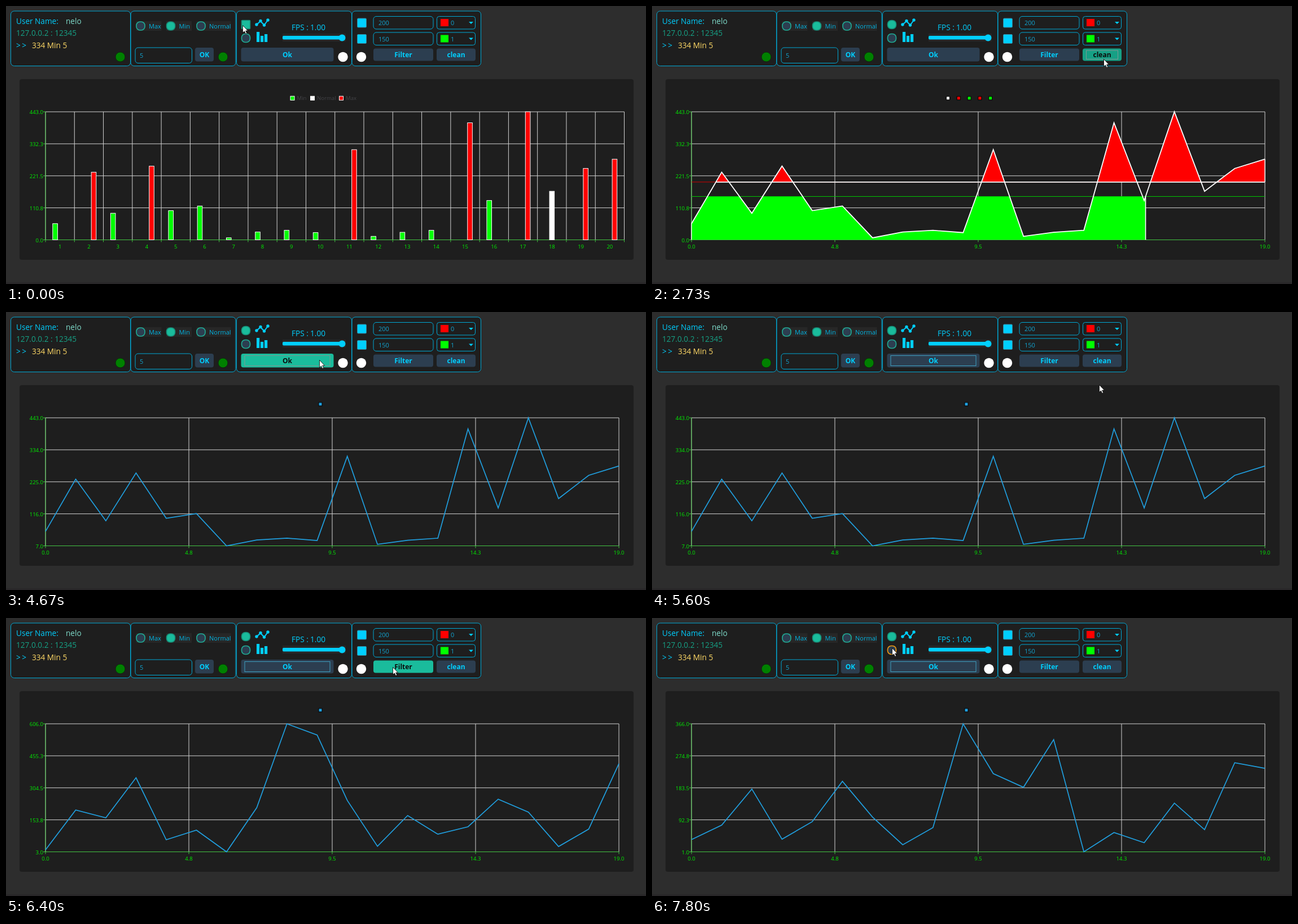
Recreate the animation shown at these times as an HTML page. Size 1134 px wide and 494 px high, loop 8000 ms.

```html
<!DOCTYPE html>
<html lang="en">
<head>
<meta charset="utf-8">
<title>Live chart panel</title>
<style>
  html, body { margin: 0; width: 100%; height: 100%; overflow: hidden; background: #2d2d2d; }
  svg { display: block; width: 1134px; height: 494px; font-family: "Open Sans", "Noto Sans", sans-serif; }
  .panel { fill: #1e1e1e; stroke: #00a9d6; }
  .field { fill: #1e1e1e; stroke: #00a9d6; }
  .cyan { fill: #00cfff; }
  .dim { fill: #12a3cf; }
  .big { font-size: 13.6px; }
  .small { font-size: 11px; }
  .axis text { font-size: 9.5px; fill: #00ee00; }
  .radio { fill: #2c3e50; stroke: #1fae96; stroke-width: 1.6; }
  .on { fill: #1abc9c; stroke: #178f79; }
  .press { stroke: #f39c12; }
  .btn rect { fill: #2c3e50; }
  .btn text { font-size: 12px; font-weight: 700; text-anchor: middle; fill: #00cfff; }
  .btn .ring { fill: none; stroke: #3f9fc0; visibility: hidden; }
  .btn.hover rect { fill: #1abc9c; }
  .btn.down rect { fill: #16a085; }
  .btn.hover text, .btn.down text { fill: #0c0c0c; }
  .btn.focus .ring { fill: none; visibility: inherit; }
  .btn.focus.hover .ring, .btn.focus.down .ring { stroke: #7c9a93; }
</style>
</head>
<body>
<svg id="stage" viewBox="0 0 1134 494" xmlns="http://www.w3.org/2000/svg"></svg>
<script>
const STEP = 200 / 3, LOOP = 8000;
const LEFT = 70, RIGHT = 1086, WIDE = 1095.5, TOP = 188, BASE = 415.5;
const LOW = 150, HIGH = 200;

const sets = [
  [56, 234, 92, 255, 101, 117, 7, 27, 33, 25, 312, 12, 26, 33, 405, 136, 443, 168, 247, 279],
  [12, 200, 163, 352, 60, 105, 3, 211, 606, 553, 245, 29, 174, 86, 121, 251, 190, 28, 110, 418],
  [48, 49, 132, 208, 151, 213, 1, 63, 13, 51, 272, 9, 211, 24, 301, 59, 237, 333, 249, 329],
  [36, 77, 180, 37, 87, 202, 100, 21, 70, 366, 224, 185, 321, 1, 56, 27, 140, 64, 255, 239]
];

const rect = (x, y, w, h, attrs = '') => `<rect x="${x}" y="${y}" width="${w}" height="${h}" ${attrs}/>`;
const text = (x, y, str, attrs = '') => `<text x="${x}" y="${y}" ${attrs}>${str}</text>`;
const line = (x1, y1, x2, y2, color, w = 1) =>
  `<path d="M${x1} ${y1}L${x2} ${y2}" stroke="${color}" stroke-width="${w}"/>`;
const dot = (x, y, r, attrs) => `<circle cx="${x}" cy="${y}" r="${r}" ${attrs}/>`;
const range = n => [...Array(n).keys()];

// Controls
const buttons = {
  OK: [335, 74, 33, 24.5],
  Ok: [416.5, 74, 164, 24.5],
  Filter: [651, 75.5, 106, 22],
  clean: [763, 75.5, 69, 22]
};

function button(name) {
  const [x, y, w, h] = buttons[name];
  return `<g class="btn" id="btn-${name}">${rect(x, y, w, h, 'rx="4"')}` +
    text(x + w / 2, y + h / 2 + 4.6, name) +
    rect(x + 6.5, y + 3.5, w - 13, h - 6.5, 'class="ring"') + '</g>';
}

const radio = (x, y, cls = '', id = '') =>
  rect(x - 7.5, y - 7.5, 15, 15, `rx="6.5" class="radio ${cls}" ${id && `id="${id}"`}`);

const option = (x, w, label, cls) =>
  rect(x - 8, 27, w, 17, 'fill="#272727"') + radio(x, 35.5, cls) +
  text(x + 14.5, 39.8, label, 'class="small" fill="#00b2e0"');

function combo(y, color, label) {
  return rect(763.5, y, 68, 22.5, 'rx="4" class="field"') +
    rect(770, y + 4.5, 14, 13, `fill="${color}"`) +
    text(788, y + 15.7, label, 'class="small dim"') +
    `<path class="cyan" d="M820 ${y + 9.5}h8l-4 4z"/>`;
}

const filterRow = (y, value, color, index) =>
  rect(622.5, y + 3.5, 16, 16, 'rx="1.5" class="cyan" stroke="#3a7f96"') +
  rect(651, y, 106, 22.5, 'rx="5" class="field"') +
  text(660, y + 15.7, value, 'class="small dim"') + combo(y, color, index);

const controls =
  [[8.5, 212], [221, 186], [408.5, 204], [613, 228.5]]
    .map(([x, w]) => rect(x, 9, w, 97.5, 'rx="6" class="panel"')).join('') +
  text(18, 32, 'User Name:', 'class="big cyan"') +
  text(106, 32, 'nelo', 'class="big" fill="#7fdccb"') +
  text(18, 52.8, '127.0.0.2 : 12345', 'class="big" fill="#16a085"') +
  text(18, 74.6, '&gt;&gt;', 'class="big cyan" letter-spacing="2.5"') +
  text(46, 74.6, '334 Min 5', 'class="big" fill="#ffd966"') +
  [202.5, 384.5].map(x => dot(x, 90.5, 8.5, 'fill="#008000" stroke="#0c2a0c"')).join('') +
  [597, 629.5].map(x => dot(x, 90.5, 8.7, 'fill="#fff"')).join('') +
  option(238.5, 45, 'Max') + option(292, 45, 'Min', 'on') + option(345.5, 61, 'Normal') +
  rect(229, 74, 100.5, 27.5, 'rx="5" class="field"') + text(237, 92, '5', 'class="small dim"') +
  radio(425, 33, 'on', 'lineOpt') + radio(425, 57, '', 'barOpt') +
  '<path d="M444 33L451 27L457.5 34L464 25" fill="none" stroke="#00cfff" stroke-width="2"/>' +
  [[444, 33], [451, 26.5], [457.5, 34], [464, 25]].map(([x, y]) => dot(x, y, 2.7, 'class="cyan"')).join('') +
  [[444, 46], [451, 53], [458, 50]].map(([x, y]) => rect(x, y, 5.2, 64 - y, 'class="cyan"')).join('') +
  text(506, 42.8, 'FPS :', 'class="big cyan"') + text(539, 42.8, '1.00', 'class="big cyan"') +
  rect(490, 49, 112, 14, 'fill="#272727"') + rect(490, 53, 108, 6.5, 'rx="2" class="cyan"') +
  dot(595.5, 56.5, 6, 'class="cyan"') +
  filterRow(18.5, HIGH, '#f00', 0) + filterRow(47, LOW, '#0f0', 1) +
  Object.keys(buttons).map(button).join('');

// Charts
const xAt = i => LEFT + i * (RIGHT - LEFT) / 19;
const yAt = (v, lo, hi) => BASE - (v - lo) / (hi - lo) * (BASE - TOP);

function axes(lo, hi, right, cols) {
  const xs = range(cols + 1).map(i => LEFT + i * (right - LEFT) / cols);
  const ys = range(5).map(i => TOP + i * (BASE - TOP) / 4);
  let out = xs.map(x => line(x, TOP, x, BASE, '#d4d4d4')).join('') +
    ys.map(y => line(LEFT, y, right, y, '#d4d4d4')).join('');
  const green = '#43c443';
  out += line(LEFT, TOP, LEFT, BASE, green) + line(LEFT, BASE, right, BASE, green) +
    xs.map(x => line(x, BASE, x, BASE + 4, green)).join('') +
    ys.map(y => line(LEFT - 4, y, LEFT, y, green)).join('');
  out += ys.map((y, i) =>
    text(66, y + 4, (hi - i * (hi - lo) / 4).toFixed(1), 'text-anchor="end"')).join('');
  out += cols === 20
    ? range(20).map(i => text((xs[i] + xs[i + 1]) / 2, 430.5, i + 1, 'text-anchor="middle"')).join('')
    : xs.map((x, i) => text(x, 430.5, (i * 4.75).toFixed(1), 'text-anchor="middle"')).join('');
  return `<g class="axis">${out}</g>`;
}

const marker = (x, color, edge = '#000', size = 6) =>
  rect(x - size / 2, 163.8 - size / 2, size, size, `fill="${color}" stroke="${edge}"`);

const points = (data, lo, hi) => data.map((v, i) => `${xAt(i).toFixed(1)} ${yAt(v, lo, hi).toFixed(1)}`).join('L');

function lineChart(data) {
  const lo = Math.min(...data), hi = Math.max(...data);
  return axes(lo, hi, RIGHT, 4) + marker(557, '#209fdf') +
    `<path d="M${points(data, lo, hi)}" fill="none" stroke="#209fdf" stroke-width="1.7"/>`;
}

function barChart(data) {
  const hi = Math.max(...data), slot = (WIDE - LEFT) / 20, w = slot / 6;
  const colors = ['#0f0', '#fff', '#f00'];
  const bars = data.map((v, i) => {
    const kind = v > HIGH ? 2 : v > LOW ? 1 : 0, y = yAt(v, 0, hi);
    return rect(LEFT + slot * (i + .25) + kind * w, y, w, BASE - y, `fill="${colors[kind]}" stroke="#fff"`);
  }).join('');
  const legend = [['Min', 507.5], ['Normal', 543], ['Max', 594]].map(([name, x], i) =>
    marker(x, colors[i], '#fff', 7) + text(x + 8, 167.2, name, 'font-size="9.6" fill="#444448"')).join('');
  return axes(0, hi, WIDE, 20) + bars + legend;
}

function areaChart(data) {
  const hi = Math.max(...data), yHigh = yAt(HIGH, 0, hi), yLow = yAt(LOW, 0, hi);
  const cross = (i, level) => xAt(i + (level - data[i]) / (data[i + 1] - data[i]));
  const start = cross(0, HIGH), end = cross(15, LOW), path = points(data, 0, hi);
  const shape = `M${path}L${RIGHT} ${BASE}L${LEFT} ${BASE}Z`;
  return `<clipPath id="above">${rect(LEFT, TOP, RIGHT - LEFT, yHigh - TOP)}</clipPath>` +
    `<clipPath id="below">${rect(LEFT, yLow, end - LEFT, BASE - yLow)}</clipPath>` +
    axes(0, hi, RIGHT, 4) +
    `<path d="${shape}" fill="#f00" clip-path="url(#above)"/>` +
    `<path d="${shape}" fill="#0f0" clip-path="url(#below)"/>` +
    line(LEFT, yHigh, RIGHT, yHigh, '#d00000') + line(LEFT, yLow, RIGHT, yLow, '#00c800') +
    line(start, yHigh, RIGHT, yHigh, '#fff', 1.8) +
    line(end, yLow, end, BASE, '#fff', 1.6) +
    line(LEFT, yAt(data[0], 0, hi), LEFT, BASE, '#fff', 1.4) +
    line(RIGHT, yAt(data[19], 0, hi), RIGHT, yHigh, '#fff', 1.4) +
    `<path d="M${path}" fill="none" stroke="#fff" stroke-width="1.8"/>` +
    ['#fff', '#f00', '#0f0', '#f00', '#0f0'].map((c, i) => marker(524.5 + i * 18.8, c)).join('');
}

const charts = [barChart(sets[0]), areaChart(sets[0]), ...sets.map(lineChart)];
const stage = document.getElementById('stage');
stage.innerHTML = rect(0, 0, 1134, 494, 'fill="#2d2d2d"') + rect(0, 491, 1134, 3, 'fill="#292729"') +
  controls + `<g id="board">${rect(24, 130, 1088, 321, 'rx="4" fill="#1e1e1e"')}` +
  charts.map(c => `<g class="chart">${c}</g>`).join('') + '</g>' +
  '<path id="cursor" d="M.5 .5V13.6L3.5 10.9L5.6 15.4L7.8 14.4L5.7 10.1H9.6Z" fill="#fff" stroke="#000" stroke-width=".8"/>';

// Timeline, counted in ticks of STEP ms
// Pointer moves: first tick, last tick, bend x, bend y, end x, end y
const moves = [
  [4, 6, 427, 36, 435, 39],
  [11, 16, 575, 62, 715, 94],
  [25, 31, 758, 94, 800, 94],
  [45, 53, 680, 92, 555, 85],
  [73, 84, 650, 226, 792, 129],
  [88, 96, 735, 108, 685, 87],
  [104, 104, 683, 87, 682, 87],
  [106, 109, 560, 66, 449, 70],
  [112, 115, 438, 61, 427, 53],
  [117, 117, 426, 53, 425, 53]
];
// First tick of each view; -1 is the empty moment between two charts
const views = [[0, 0], [20, 1], [42, 2], [86, -1], [87, 3], [101, 4], [116, -1], [117, 5]];
const focuses = [[0, 'lineOpt'], [19, 'Filter'], [41, 'clean'], [69, 'Ok']];
const presses = { Filter: [19, 20], clean: [41, 41], Ok: [69, 69] };

const latest = (list, tick) => list.filter(e => e[0] <= tick).pop()[1];

function pointer(tick) {
  let x = 419, y = 34;
  for (const [from, to, bx, by, ex, ey] of moves) {
    if (tick < from) break;
    const p = Math.min(1, (tick - from + 1) / (to - from + 1));
    const t = p * p * (3 - 2 * p), u = 1 - t;
    x = u * u * x + 2 * u * t * bx + t * t * ex;
    y = u * u * y + 2 * u * t * by + t * t * ey;
  }
  return [Math.round(x), Math.round(y)];
}

const $ = id => document.getElementById(id);
const views$ = [...document.querySelectorAll('.chart')];
let shown = -1;

function draw(tick) {
  const [x, y] = pointer(tick), view = latest(views, tick), focus = latest(focuses, tick);
  $('cursor').setAttribute('transform', `translate(${x} ${y})`);
  $('board').style.display = view < 0 ? 'none' : '';
  views$.forEach((el, i) => { el.style.display = i === view ? '' : 'none'; });
  for (const [name, [bx, by, w, h]] of Object.entries(buttons)) {
    const [from, to] = presses[name] || [-1, -1], list = $('btn-' + name).classList;
    list.toggle('hover', x >= bx && x < bx + w && y >= by && y < by + h);
    list.toggle('down', tick >= from && tick <= to);
    list.toggle('focus', name === focus);
  }
  $('lineOpt').setAttribute('rx', focus === 'lineOpt' ? 1 : 6.5);
  $('barOpt').classList.toggle('press', tick >= 117);
}

function loop() {
  const tick = Math.floor((performance.now() % LOOP + 4) / STEP) % 120;
  if (tick !== shown) draw(shown = tick);
  requestAnimationFrame(loop);
}
loop();
</script>
</body>
</html>
```
